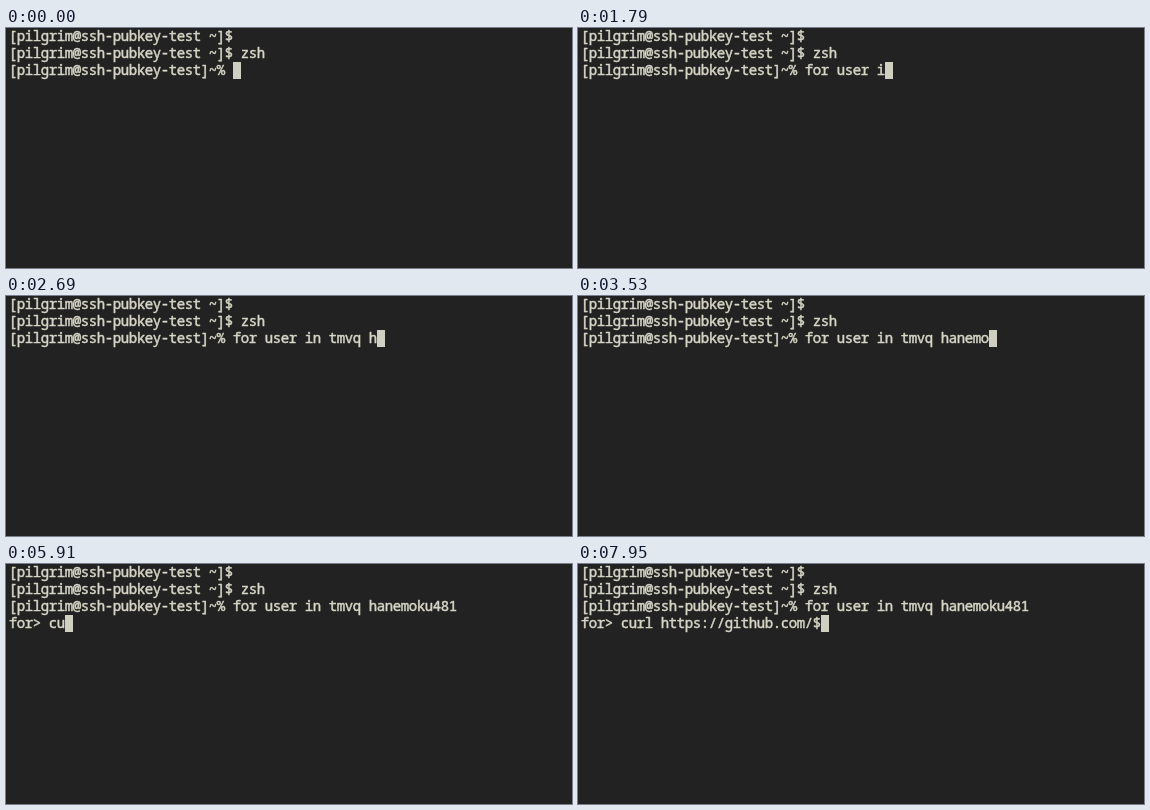
Recreate the animation shown at these times as an HTML page with a canvas. Size 566x240 px, loop 8000 ms.

```html
<!DOCTYPE html>
<html lang="en">
<head>
<meta charset="utf-8">
<title>Terminal</title>
<style>
  html, body { margin: 0; width: 100%; height: 100%; overflow: hidden; background: #222; }
  canvas { display: block; }
</style>
</head>
<body>
<canvas id="stage" width="566" height="240"></canvas>
<script>
const LOOP = 8000;
const CELL = 8, ROW = 17, LEFT = 3, BASELINE = 13;
const BACK = '#222222', INK = '#d6d5c6', CURSOR = '#cfcfc2';

const host = '[pilgrim@ssh-pubkey-test';
const start = `${host} ~]$\n${host} ~]$ zsh\n${host}]~% `;

// Bursts of typing: first key time, last key time, text added per step.
const bursts = [
  [420, 1010, ['f', 'or', ' ', 'u', 's', 'e', 'r', ' ']],
  [1790, 1850, [...'in']],
  [1960, 2270, [...' tmv']],
  [2450, 2690, [...'q h']],
  [2870, 2870, ['a']],
  [3050, 3110, [...'ne']],
  [3410, 3760, [...'moku']],
  [4300, 4540, [...'48']],
  [4770, 4770, ['1']],
  [5370, 5370, ['\nfor> ']],
  [5790, 6210, [...'curl ']],
  [6510, 6510, ['https://github.com/']],
  [7950, 7950, ['$']]
];

const keys = bursts.flatMap(([from, to, parts]) =>
  parts.map((text, i) => ({
    at: Math.round((from + (to - from) * i / Math.max(1, parts.length - 1)) / 10) * 10,
    text
  })));

const ctx = document.getElementById('stage').getContext('2d');

function screenText(time) {
  return start + keys.filter(key => key.at <= time).map(key => key.text).join('');
}

// A fine outline gives the letters their medium weight.
function drawChar(char, col, row) {
  const x = LEFT + (col + 0.5) * CELL;
  const y = row * ROW + BASELINE;
  ctx.fillText(char, x, y);
  ctx.strokeText(char, x, y);
}

function draw(time) {
  const lines = screenText(time).split('\n');
  ctx.fillStyle = BACK;
  ctx.fillRect(0, 0, 566, 240);

  ctx.font = '14px "Noto Sans Mono", "DejaVu Sans Mono", monospace';
  ctx.textAlign = 'center';
  ctx.lineJoin = 'round';
  ctx.lineWidth = 0.5;
  ctx.fillStyle = ctx.strokeStyle = INK;
  lines.forEach((line, row) => {
    [...line].forEach((char, col) => drawChar(char, col, row));
  });

  const row = lines.length - 1;
  ctx.fillStyle = CURSOR;
  ctx.fillRect(LEFT + lines[row].length * CELL, row * ROW, CELL, ROW);
}

const begun = performance.now();
function tick() {
  draw((performance.now() - begun) % LOOP);
  requestAnimationFrame(tick);
}
tick();
</script>
</body>
</html>
```
